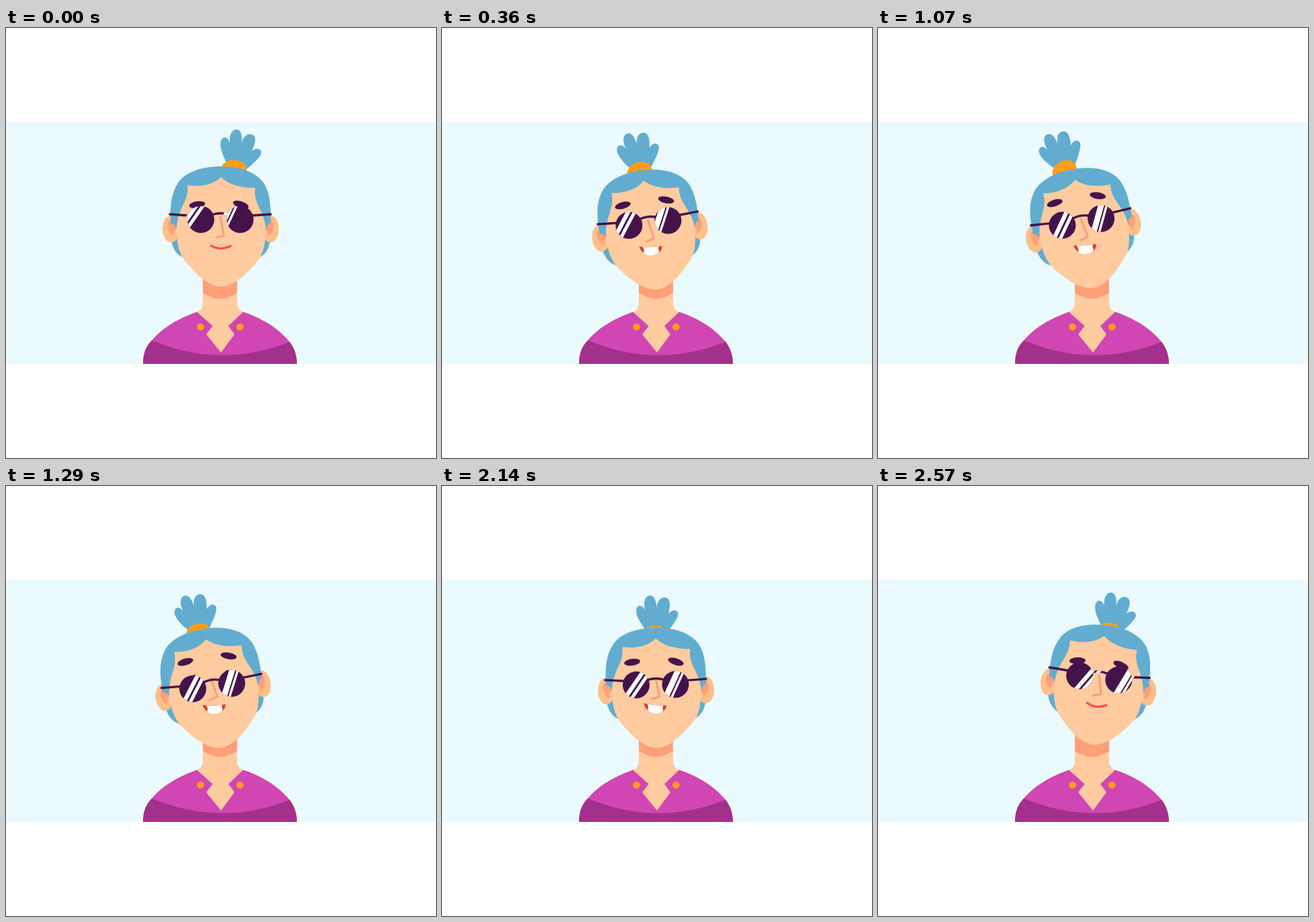
Write an HTML page that moves like this. It is 640 px wide and 640 px high and loops after 2.64 s.

```html
<!DOCTYPE html>
<html lang="en">
<head>
<meta charset="utf-8">
<title>Head tilt</title>
<style>
  html, body { margin: 0; width: 100%; height: 100%; overflow: hidden; background: #fff; }
  svg { display: block; width: 100vw; height: 100vh; }
  .hair { fill: #62adcf; }
  .skin { fill: #ffcb9f; }
  .ear { fill: #ffbf88; }
  .blush { fill: #ff9f78; }
  .dark { fill: #45134c; }
  .gold { fill: #ff9d1c; }
  .line { fill: none; stroke-linecap: round; stroke-linejoin: round; }
  .frame { stroke: #45134c; stroke-width: 3.4; }
</style>
</head>
<body>
<svg viewBox="0 0 640 640">
  <defs>
    <g id="ear">
      <ellipse class="ear" cx="245.500" cy="299" rx="12.500" ry="20"/>
      <path class="blush" d="M253 288C246 284 241 287 241 294C241 302 245 307 250 310C248 304 250 301 254 300Z"/>
    </g>
    <mask id="glassesMask" maskUnits="userSpaceOnUse" x="230" y="255" width="180" height="60">
      <g fill="#fff">
        <circle cx="290" cy="285" r="20"/>
        <circle cx="348.500" cy="285" r="20"/>
      </g>
      <path class="line" stroke="#fff" stroke-width="3.4" d="M244 277.300L271 279M308 277.500Q319 274 331 277.500M367 279L394 277.300"/>
    </mask>
  </defs>

  <rect y="140" width="640" height="360" fill="#eafaff"/>

  <path class="skin" d="M293 365V411Q293 418 284 423L300 470L320 486L340 470L353 423Q344 418 344 411V365Z"/>
  <path class="blush" d="M293 365V394Q318.500 412 344 394V365Z"/>
  <path fill="#d046b3" d="M204 500C204 485 208 474 217 465C236 442 264 430 284 422.500L307.500 443.500L298 456L320 483L340 456L331 443.500L353 422.500C375 430 402 443 422 467C429 476 433 487 433 500Z"/>
  <path fill="#a3318b" d="M204 500C204 485 208 474 217 465Q320 508 422 467C429 476 433 487 433 500Z"/>
  <circle class="gold" cx="289.500" cy="445" r="5.300"/>
  <circle class="gold" cx="348.300" cy="445" r="5.300"/>

  <g id="bun">
    <path class="hair" d="M331 206C323 191 318 179 319.500 170C321 161 330 160 333 171C332 158 337 151 343 151C350 151 352 160 350.500 171C353 162 359 156 366 158.500C374 162 371 172 366 183C372 178 379 179 380 185C380 191 371 199 356 212Z"/>
    <ellipse class="gold" cx="339" cy="211" rx="19" ry="15"/>
  </g>

  <g id="head">
    <path class="hair" d="M246 300V316Q249 336 266 343L374 343Q391 336 393 316V300Z"/>
    <use href="#ear"/>
    <use href="#ear" transform="matrix(-1 0 0 1 639 0)"/>
    <path class="skin" d="M253 292C253 312 256 330 263 342C277 361 300 385 320 385C340 385 363 362 378 342C384 332 387 312 387 292L376 225L320 214L264 225Z"/>
    <path class="hair" d="M245 291C244 268 245 250 254 234C264 215 290 206 320 206C350 206 374 215 385 233C394 249 394 268 394 291Q388 290 387 303C386 272 367 262 371 238C348 238 332 233 320 222C308 233 291 237 270 234C273 258 255 268 254 298Q250 291 245 291Z"/>
    <path class="line" stroke="#ff9b74" stroke-width="2.800" d="M319 281L324.500 309L313 312"/>
    <path id="smile" class="line" stroke="#ff5056" stroke-width="3.500" d="M305.500 324Q319 332 334 324.500"/>
    <g id="grin" transform="translate(0 -.5)">
      <path fill="#d9432c" d="M301 318.500Q318 323 335 322Q334 329 329 331L308 330Q303 327 301 318.500Z"/>
      <path fill="#fff" d="M306 319.700Q318 322.600 330 322.200Q328 326 330 329.500Q325 334.500 317 334Q309 333 306.500 328.500Q309 324 306 319.700Z"/>
    </g>
    <g id="eyes" class="dark">
      <circle cx="294" cy="277" r="5.200"/>
      <circle cx="344.500" cy="277" r="5.200"/>
    </g>
    <g id="brows" class="dark">
      <ellipse cx="284.500" cy="263" rx="12" ry="5" transform="rotate(-8 284.500 263)"/>
      <ellipse cx="349.500" cy="263" rx="12" ry="5" transform="rotate(18 349.500 263)"/>
    </g>
    <g id="glasses">
      <path class="line frame" d="M244 277.300L271 279M308 277.500Q319 274 331 277.500M367 279L394 277.300"/>
      <circle class="dark" cx="290" cy="285" r="20"/>
      <circle class="dark" cx="348.500" cy="285" r="20"/>
      <g mask="url(#glassesMask)">
        <path id="glare" fill="#fff"/>
      </g>
    </g>
  </g>
</svg>
<script>
  const LOOP = 2640, FRAMES = 37, STEP = LOOP / FRAMES;
  const MOVES = [85, 1050, 1965], MOVE_TIME = 510;
  const POSE = {
    tilt: [0, -9.9, -6.9, 6],
    bunX: [339, 277, 291, 343.5],
    bunY: [211, 211, 219, 218.5],
    bunTurn: [0, -30, -21.5, -1],
    slide: [0, 0, 11, 0],
    lift: [0, 12, 12, 0]
  };

  const el = id => document.getElementById(id);
  const parts = Object.fromEntries(
    ["bun", "head", "smile", "grin", "eyes", "brows", "glasses", "glare"].map(id => [id, el(id)]));
  const ramp = (t, from, to) => Math.min(1, Math.max(0, (t - from) / (to - from)));
  const smooth = x => x * x * (3 - 2 * x);
  const place = (part, value) => part.setAttribute("transform", value);
  const show = (part, visible) => part.setAttribute("visibility", visible ? "visible" : "hidden");

  // Slanted bar through (x, 285), tall enough to cross a lens.
  function bar(x, width, slope) {
    const lean = slope * 24;
    return `M${x + lean} 261h${width}L${x + width - lean} 309h${-width}Z`;
  }

  function render(t) {
    const phases = MOVES.map(s => Math.pow(ramp(t, s, s + MOVE_TIME), 0.67));
    const eased = phases.map(smooth);
    const pose = name => POSE[name].reduce(
      (sum, v, i, keys) => i ? sum + (v - keys[i - 1]) * eased[i - 1] : v, 0);
    const dip = 5 * phases.reduce((sum, x) => sum + Math.sin(Math.PI * x), 0);

    place(parts.head, `translate(0 ${dip}) rotate(${pose("tilt")} 319.5 380)`);
    place(parts.bun, `translate(${pose("bunX")} ${pose("bunY") + dip * 0.8}) rotate(${pose("bunTurn")}) translate(-339 -211)`);
    place(parts.glasses, `translate(0 ${pose("slide")})`);
    place(parts.brows, `translate(0 ${-pose("lift")})`);

    const peek = ramp(t, 1570, 1785) * (1 - ramp(t, 1965, 2140));
    place(parts.eyes, `translate(0 ${-7 * smooth(peek)})`);

    const grinning = t > 250 && t < 2250;
    show(parts.grin, grinning);
    show(parts.smile, !grinning);

    const shine = -16 + 18 * ramp(t, 105, 640) + 15 * ramp(t, 2140, 2590);
    const left = 290 + shine, right = 345 + shine;
    parts.glare.setAttribute("d",
      bar(left - 9, 7.5, 0.7) + bar(left + 2, 6, 0.7) +
      bar(right - 9, 9.5, 0.47) + bar(right + 2.7, 3.8, 0.47));
  }

  const start = performance.now();
  function tick() {
    const t = (performance.now() - start) % LOOP;
    const frame = Math.min(FRAMES - 1, Math.floor(t / STEP + 0.1));
    render(frame * STEP);
    requestAnimationFrame(tick);
  }
  tick();
</script>
</body>
</html>
```
